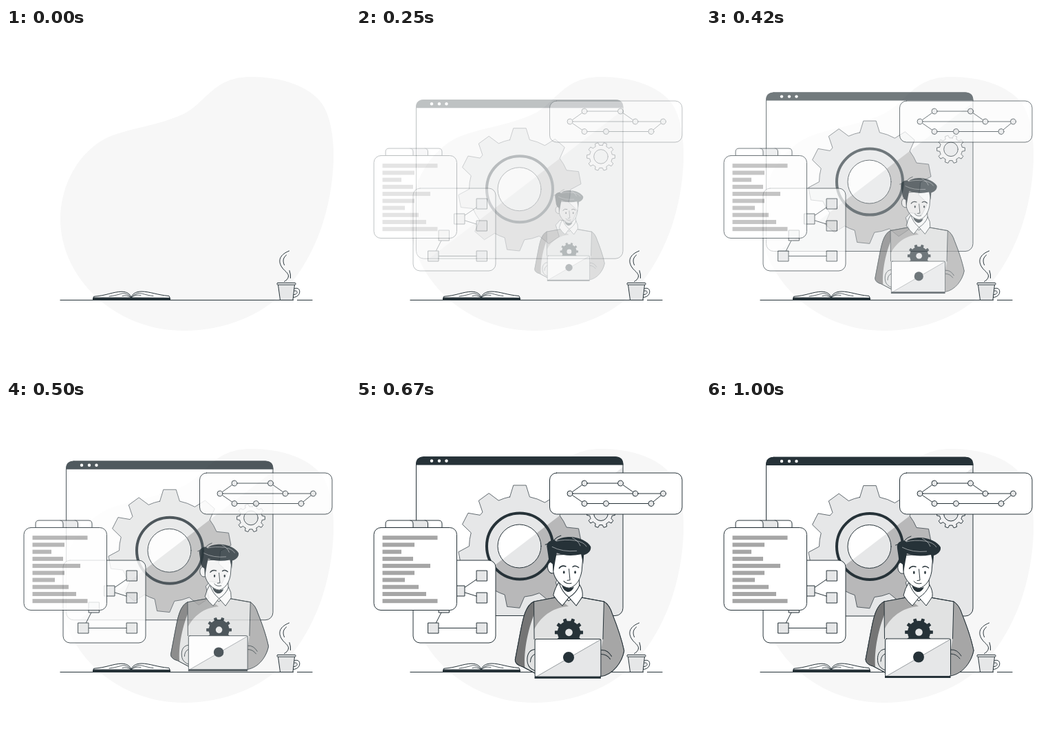
Animation of 500x500 px, one loop 1.04 s. Source, as an HTML page:

```html
<!DOCTYPE html>
<html lang="en">
<head>
<meta charset="utf-8">
<title>Developer at a desk</title>
<style>
  html, body { margin: 0; width: 100%; height: 100%; overflow: hidden; background: #fff; }
  svg { display: block; width: 100vw; height: 100vh; }
  .ink { stroke: #263238; stroke-width: 1; stroke-linecap: round; stroke-linejoin: round; fill: none; }
  .white { fill: #fff; }
  .pale { fill: #e6e7e8; }
  .mid { fill: #a6a6a6; }
  .dark { fill: #263238; }
</style>
</head>
<body>
<svg viewBox="0 0 500 500">
  <defs>
    <clipPath id="shade"><path d="M388 98L106 314V330H400V89Z"/></clipPath>
    <clipPath id="lid"><rect x="260.5" y="347" width="95" height="54.5" rx="2"/></clipPath>
  </defs>

  <path fill="#f7f7f7" d="M79 278C79 228 106 178 150 158C186 144 222 142 260 124C292 107 302 71 356 71C400 71 441 84 460 111C475 134 477 175 476 194C473 262 452 330 405 382C372 418 316 440 259 440C155 440 79 360 79 278Z"/>

  <g id="pane">
    <rect class="white" x="87.5" y="83.300" width="300.5" height="230.700" rx="11"/>
    <rect class="pale" x="87.5" y="83.300" width="300.5" height="230.700" rx="11" clip-path="url(#shade)"/>
    <rect class="ink" x="87.5" y="83.300" width="300.5" height="230.700" rx="11"/>
    <path class="dark" d="M87 95V94.500Q87 82.800 98.500 82.800H377Q388.500 82.800 388.500 94.500V95Z"/>
    <g class="white">
      <circle cx="110" cy="89" r="2.200"/><circle cx="121" cy="89" r="2.200"/><circle cx="131.500" cy="89" r="2.200"/>
    </g>
    <path class="cog pale"/>
    <g clip-path="url(#shade)"><path class="cog" fill="#b8b8b9"/></g>
    <path class="cog ink" style="stroke-width:.7"/>
    <circle cx="238" cy="213" r="48" fill="none" stroke="#263238" stroke-width="4"/>
    <circle class="white" cx="237.500" cy="213" r="31.500"/>
    <circle class="pale" cx="237.500" cy="213" r="31.500" clip-path="url(#shade)"/>
    <circle class="ink" cx="237.500" cy="213" r="31.500"/>
    <path id="smallCog" class="ink" style="fill:#f1f1f2"/>
    <circle class="ink" style="fill:#e6e7e8" cx="356" cy="165.700" r="10.300"/>
  </g>

  <g id="cards">
    <g>
      <rect class="ink" style="fill:#fff" x="281.500" y="106" width="192.500" height="60" rx="10"/>
      <path class="ink" d="M406 136L384.500 121H332L311 136H446.500L429 150.500H332L311 136"/>
      <g id="nodes"></g>
    </g>
    <g>
      <rect class="ink" style="fill:#fff" x="83" y="233" width="120" height="120" rx="10"/>
      <path class="ink" d="M183 255.500L150.500 277.500L183 287.500M128 301L112.500 331.500H183"/>
      <g id="boxes"></g>
    </g>
    <g>
      <path class="ink" style="fill:#fff" d="M96 185V180Q96 175 101 175H120Q125 175 125 180V185Z"/>
      <path class="ink" style="fill:#e6e7e8" d="M75 185V180Q75 175 80 175H99.500Q104.500 175 104.500 180V185Z"/>
      <path class="ink" style="fill:#fff" d="M43 185V180Q43 175 48 175H78Q83 175 83 180V185Z"/>
      <rect class="ink" style="fill:#fff" x="26" y="185.500" width="120.500" height="120" rx="10"/>
      <g id="bars" class="mid"></g>
    </g>
  </g>

  <path class="ink" style="stroke-linecap:butt" d="M78.500 395.500H418M423 395.500H445.500"/>

  <g>
    <path class="dark" d="M126 395.500V392.500Q126 391.500 128 391.500H237Q239 391.500 239 393V395.500Z"/>
    <path class="ink" style="fill:#fff" d="M182 392H127.500V390.300C146 389 155 383.500 168 383.200C176 383.200 181 387 182 392C183 387 188 383 197 383C210 383.200 219 388 237 389.500L238 392Z"/>
    <path class="ink" style="stroke-width:.8" d="M150 390C163 388.500 167 385.500 172 385.800Q179 387 182 392M169 389.500Q176 387.300 182 392M214 389.500C203 388.500 198 385 192 385.500Q185 387 182 392M196 388.500Q187 386.700 182 392"/>
  </g>

  <g>
    <path class="ink" style="fill:#fff" d="M418.500 379C430 374 430 392 416.500 391.500L417.500 387.500C425 388 425 379.500 418 382.500Z"/>
    <path class="ink" style="fill:#e6e7e8" d="M395.500 373L398.500 395.500H417L419.500 373Z"/>
    <rect class="ink" style="fill:#fff" x="394" y="370.500" width="27" height="2.700" rx="1"/>
    <path class="ink" d="M411.500 324C399 329 394.500 337 400.500 347C404 353 411 356 410.500 361C410 365 407 367 404.500 368.500M407.500 330C402.500 334 402 339 404.500 344.500M412 352.500Q414 358 413.500 363.500"/>
  </g>

  <g id="person">
    <path class="ink" style="fill:#e1e2e2" d="M292 287L259 293C246 299 243 320 239 340L232 377Q232 384 243 387L262 397H355C374 396 386 380 389 364C385 345 378 326 372 311Q368 298 360 293L326 287Z"/>
    <path fill="#757575" d="M259 293C246 299 243 320 239 340L232 377Q232 384 246 388C244 366 250 330 264 301Z"/>
    <path class="mid" d="M259 293L292 287L309 300C290 301 271 311 259.500 333Z"/>
    <path class="mid" d="M360 293Q368 298 372 311C378 326 385 345 389 364C386 380 374 398 355.500 401V365L358.500 347Z"/>
    <path class="ink" d="M259 293C246 299 243 320 239 340L232 377Q232 384 243 387L262 397M259 293L292 287M326 287L360 293Q368 298 372 311C378 326 385 345 389 364C386 380 374 398 355.500 401M259 293L259.500 347M360 293L358.500 347"/>
    <path class="ink" d="M260 362C251 363 248 372 250 382Q252 390 261 393M260 369Q254 372 254 380M356 363Q365 362 371 372M356 369Q364 369 369 376"/>

    <path class="ink" style="fill:#fff" d="M296 259V281L309 292L325 282L324 259Z"/>
    <path class="dark" d="M299 269Q307 276 317 272Q313 280 307 279Q301 277 299 269Z"/>
    <path class="ink" style="fill:#fff" d="M295 265Q289 274 287 284Q293 293 300 299L309.500 287Q299 279 295 265ZM325 269Q330 277 329 286L320 299L309.500 287Q320 281 325 269Z"/>

    <path class="ink" style="fill:#fff" d="M288 238C280 231 276 244 281 250Q284 254 289 251Z"/>
    <path class="ink" style="fill:#fff" d="M287 226V250C289 262 300 273 310 273.500C320 271 326 261 328 249L330 224Z"/>
    <path class="dark" d="M287 251L286 239Q280 236 279.500 226L278 216Q276 208 284 205Q288 203 291 206Q295 201 308 200C322 199 337 206 341 214C342 221 335 225 331 226L330 239L327 225Q307 229 292 223L290 233Z"/>
    <path fill="none" stroke="#c4c7c9" stroke-width=".7" d="M291 206Q303 203 318 205Q331 207 335 214M285 214Q300 222 321 220M314 201Q323 205 326 213"/>
    <path class="ink" d="M275.500 211Q285 207 291 210M284 214Q286 202 298 198"/>
    <path class="ink" style="stroke-width:1.500" d="M295.500 245Q299 240 305 242.500M315 243Q319 240 323.500 244"/>
    <g class="dark">
      <ellipse cx="302.300" cy="250.800" rx="1.300" ry="2.200"/><ellipse cx="318.500" cy="250.800" rx="1.300" ry="2.200"/>
    </g>
    <path class="ink" d="M309.500 246L311 262L307 262.500M302 263.500Q306 268.500 313 266.500"/>

    <path id="badge" class="dark"/>
    <circle class="pale" cx="309.500" cy="337.500" r="5.300"/>
    <rect class="white" x="260.500" y="347" width="95" height="54.500" rx="2"/>
    <path class="pale" clip-path="url(#lid)" d="M355.500 347L260.500 402H356Z"/>
    <path class="ink" style="stroke-width:.4" d="M355 348L263 401"/>
    <rect class="ink" x="260.500" y="347" width="95" height="54.500" rx="2"/>
    <rect class="dark" x="260" y="401" width="95.500" height="3"/>
    <circle class="dark" cx="309" cy="373.500" r="8"/>
  </g>
</svg>
<script>
  const $ = id => document.getElementById(id);
  const LOOP = 1040, FPS = 24, RISE = 30;
  const CENTER = [310.5, 302];

  // Toothed wheel; tipA and footA are half-widths in degrees.
  function cog(cx, cy, tipR, rootR, tipA, footA, teeth) {
    const at = (r, deg) => {
      const a = (deg - 90) * Math.PI / 180;
      return (cx + r * Math.cos(a)).toFixed(2) + " " + (cy + r * Math.sin(a)).toFixed(2);
    };
    const arc = `A${rootR} ${rootR} 0 0 1 `;
    const d = teeth.map(a => at(rootR, a - footA) + "L" + at(tipR, a - tipA) +
      "L" + at(tipR, a + tipA) + "L" + at(rootR, a + footA)).join(arc);
    return "M" + d + arc + at(rootR, teeth[0] - footA) + "Z";
  }
  const even = Array.from({ length: 10 }, (_, i) => 18 + i * 36);
  const uneven = [0, 41, 79, 116, 146, 186, 221, 259, 297, 324];
  const bigCog = cog(238, 213.4, 89.4, 73.5, 5.9, 11.3, uneven);
  document.querySelectorAll(".cog").forEach(el => el.setAttribute("d", bigCog));
  $("smallCog").setAttribute("d", cog(356, 165.7, 20.5, 16.5, 6.5, 10.5, even));
  $("badge").setAttribute("d", cog(309.5, 337.5, 20.5, 16.5, 6.5, 9, even));

  $("nodes").innerHTML = [
    [332, 121], [384.5, 121], [311, 136], [406, 136],
    [446.5, 136], [332, 150.5], [363.5, 150.5], [429, 150.5]
  ].map(([x, y]) => `<circle class="ink" style="fill:#e6e7e8" cx="${x}" cy="${y}" r="4"/>`).join("");

  $("boxes").innerHTML = [
    [183, 255.5], [183, 287.5], [150.5, 277.5], [128, 301.5], [112.5, 331.5], [183, 331.5]
  ].map(([x, y]) => `<rect class="ink" style="fill:#e6e7e8" x="${x - 7.5}" y="${y - 7.5}" width="15" height="15"/>`).join("");

  $("bars").innerHTML = [80, 46.5, 27.5, 44.5, 69.5, 46.5, 32.5, 52.5, 63.5, 80]
    .map((w, i) => `<rect x="38.5" y="${197.2 + i * 10.22}" width="${w}" height="6"/>`).join("");

  // cubic-bezier(.36, -.01, .5, 1.38)
  const curve = (a, b, s) => 3 * a * s * (1 - s) ** 2 + 3 * b * s * s * (1 - s) + s ** 3;
  function ease(x) {
    if (x >= 1) return 1;
    let lo = 0, hi = 1;
    for (let i = 0; i < 30; i++) {
      const s = (lo + hi) / 2;
      if (curve(.36, .5, s) < x) lo = s; else hi = s;
    }
    return curve(-.01, 1.38, lo);
  }

  function draw(now) {
    const t = now % LOOP;
    const step = Math.min(FPS, Math.floor((t + 5) * FPS / 1000));
    const p = step < 2 ? 0 : ease(step / FPS + .035);
    const alpha = Math.max(0, Math.min(1, p));
    const k = .5 + .5 * p, [cx, cy] = CENTER;

    $("pane").setAttribute("opacity", alpha);
    $("pane").setAttribute("transform", `translate(0 ${RISE * (1 - p)})`);
    for (const card of $("cards").children) card.setAttribute("opacity", alpha);
    $("person").setAttribute("opacity", alpha);
    $("person").setAttribute("transform", `translate(${cx} ${cy}) scale(${k}) translate(${-cx} ${-cy})`);
  }

  const start = performance.now();
  function tick() {
    draw(performance.now() - start);
    requestAnimationFrame(tick);
  }
  tick();
</script>
</body>
</html>
```
